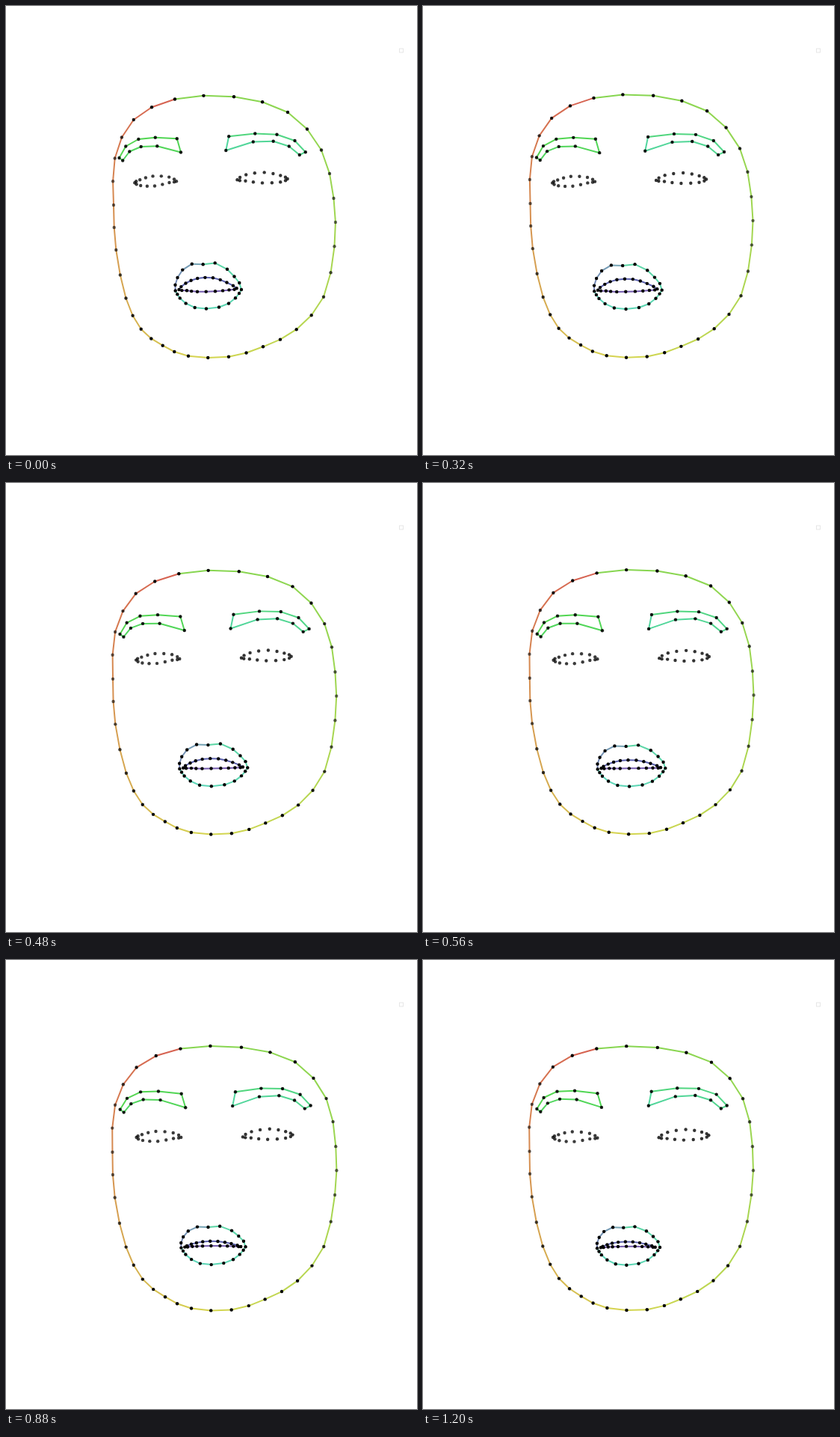
These frames come from a looping animation (550x600 px, 1.28 s). An HTML page with a canvas:

```html
<!DOCTYPE html>
<html lang="en">
<head>
<meta charset="utf-8">
<title>Face landmarks</title>
<style>
html, body { margin: 0; width: 100%; height: 100%; overflow: hidden; background: #fff; }
canvas { display: block; width: 550px; height: 600px; }
</style>
</head>
<body>
<canvas id="stage" width="550" height="600"></canvas>
<script>
const LOOP = 1280, STEP = 80;
const ctx = document.getElementById('stage').getContext('2d');
const hsl = (h, s, l) => `hsl(${h},${s}%,${l}%)`;

function ease(time, from, to) {
  const f = Math.min(1, Math.max(0, (time - from) / (to - from)));
  return f * f * (3 - 2 * f);
}

// Three gestures drive every landmark.
const gestures = time => ({
  turn: ease(time, 80, 720) - 0.27 * ease(time, 720, 1120),
  nod: ease(time, 0, 1100),
  shut: ease(time, 160, 860)
});

// Adds a point halfway between each pair of neighbours on a smooth closed curve.
function refine(points) {
  const n = points.length;
  return points.flatMap((p, i) => {
    const before = points[(i + n - 1) % n], q = points[(i + 1) % n], after = points[(i + 2) % n];
    return [p, p.map((v, k) => (9 * (v + q[k]) - before[k] - after[k]) / 16)];
  });
}

const mouthX = (u, { turn, shut }) => turn * (14 + 6.2 * u) - shut * (6 + 6.7 * u);
const mouthY = ({ turn, nod }) => 4.2 * nod - 1.3 * turn;

// move: shift of a landmark at u, v, which run from -1 to 1 across the part.
const outline = {
  shape: refine([[226, 124.5], [305, 121.2], [377, 142], [422, 192.5], [438.5, 257], [439.5, 321.3],
    [425, 388.7], [388.7, 432.2], [344, 455.3], [298, 468.8], [244, 467.7], [209.7, 453.7],
    [180.7, 431.8], [160.5, 390.5], [147.3, 326], [144, 266], [145.7, 203.5], [170.8, 152]]),
  ink: i => hsl(8 + 88 * (1 - (i / 35) ** 1.4), 62, 58),
  alpha: u => 1 - 0.42 * u ** 6,
  move: (u, v, { turn, nod }) => [
    turn * (0.5 + 7.8 * v * v + 1.7 * u) - nod * (0.8 + 3.3 * v * (1 + 0.9 * u)),
    turn * (1.8 * v - 1.7 * u - 1.3) - nod * (2 + 6 * u * u - 2.5 * u)
  ]
};

const leftBrow = {
  shape: [[151.5, 203], [160.3, 187.5], [177.3, 178], [199.8, 175.7], [228.8, 177.2],
    [234, 195.5], [202.3, 187.2], [180.7, 188], [165.3, 194.5], [156.2, 206.5]],
  ink: i => hsl(118 + i, 62, 58),
  alpha: () => 0.88,
  move: (u, v, { turn, nod }) => [
    turn * (4.4 + 2.8 * u) - 0.3 * nod,
    turn * (2 + 0.3 * u) + nod * (2.5 * u - 2.8)
  ]
};

const rightBrow = {
  shape: [[298.2, 174.2], [333.3, 170.5], [362.5, 171.7], [386.5, 180], [400.8, 195.2],
    [392.8, 199], [378.8, 187.5], [357.7, 180.8], [330.8, 181.5], [294.3, 193]],
  ink: i => hsl(140 + i * 1.6, 62, 58),
  alpha: () => 0.9,
  move: (u, v, { turn, nod }) => [
    turn * (7.3 - 1.1 * u) + 1.4 * nod,
    turn * (1.1 - 1.1 * u) - nod * (0.3 + 0.4 * u)
  ]
};

const leftEye = {
  shape: refine([[172.3, 236.2], [179.2, 232.2], [196.5, 227.4], [218.2, 228.6],
    [228, 234.2], [218.5, 236], [199, 240.5], [180.2, 240]]),
  alpha: () => 0.77,
  move: (u, v, { turn, nod }) => [
    turn * (4.3 + 1.2 * u) + nod * (0.4 + u),
    nod * (2.8 + 2 * u) - turn * (0.8 + 0.9 * u)
  ]
};

const rightEye = {
  shape: refine([[309.5, 232.2], [321.2, 225.5], [345.7, 222.4], [367.3, 226.5],
    [376.7, 231], [367.2, 235.2], [343, 236.4], [320.5, 233.8]]),
  alpha: () => 0.8,
  move: (u, v, { turn, nod }) => [
    turn * (7.3 - 0.35 * u) + 0.6 * nod,
    nod * (5.2 - 0.9 * u) - 1.4 * turn
  ]
};

const outerLips = {
  shape: [[226.7, 380.5], [226.5, 372.8], [229.5, 363], [236.3, 352.6], [248.8, 344.7],
    [263.7, 345.3], [279.7, 343.4], [296, 351.8], [305.5, 361.5], [312.3, 370],
    [315, 379], [312, 384], [307, 390.3], [298, 397.5], [285, 402.5],
    [268, 404.5], [252.7, 403], [240.7, 397.4], [232.8, 390.4], [229.3, 385.3]],
  ink: i => i < 5 ? hsl(228 - i * 8, 30, 58) : hsl(152 + i * 0.8, 60, 60),
  alpha: () => 1,
  move: (u, v, g) => [mouthX(u, g), mouthY(g) + g.shut * 9.7 * ((1 - v) / 2) ** 2]
};

const innerLips = {
  shape: refine([[231.5, 379], [240.5, 370.5], [256.2, 364], [277, 363.3], [295.5, 369.5],
    [308.7, 377.3], [298.5, 379.4], [280, 381.2], [256, 381.7], [242, 380.3]]),
  ink: i => hsl(i < 10 ? 236 : 258, 34, 52),
  alpha: () => 1,
  move: (u, v, g) => [mouthX(u, g), mouthY(g) + g.shut * (4 - 6.3 * v + 2.5 * u * u)]
};

const parts = [outline, leftBrow, rightBrow, leftEye, rightEye, outerLips, innerLips];

// Position of each value between the smallest (-1) and the largest (1).
function normalise(values) {
  const low = Math.min(...values), high = Math.max(...values);
  return values.map(v => 2 * (v - low) / (high - low) - 1);
}

for (const part of parts) {
  part.u = normalise(part.shape.map(p => p[0]));
  part.v = normalise(part.shape.map(p => p[1]));
}

function pose(part, g) {
  return part.shape.map(([x, y], i) => {
    const [dx, dy] = part.move(part.u[i], part.v[i], g);
    return [x + dx, y + dy];
  });
}

function drawLines(part, points) {
  points.forEach((p, i) => {
    ctx.strokeStyle = part.ink(i);
    ctx.beginPath();
    ctx.moveTo(...p);
    ctx.lineTo(...points[(i + 1) % points.length]);
    ctx.stroke();
  });
}

function drawDots(part, points) {
  points.forEach(([x, y], i) => {
    ctx.fillStyle = `rgba(0,0,0,${part.alpha(part.u[i])})`;
    ctx.beginPath();
    ctx.arc(x, y, 2.2, 0, Math.PI * 2);
    ctx.fill();
  });
}

function draw(time) {
  ctx.fillStyle = '#fff';
  ctx.fillRect(0, 0, 550, 600);
  ctx.lineWidth = 1;
  ctx.strokeStyle = '#e6e6e6';
  ctx.strokeRect(526.5, 57, 5, 5);
  ctx.lineWidth = 2;
  ctx.lineCap = 'round';
  const g = gestures(time);
  const poses = parts.map(part => pose(part, g));
  parts.forEach((part, i) => part.ink && drawLines(part, poses[i]));
  parts.forEach((part, i) => drawDots(part, poses[i]));
}

function tick() {
  const time = performance.now() % LOOP;
  draw(Math.floor(time / STEP) * STEP);
  requestAnimationFrame(tick);
}
tick();
</script>
</body>
</html>
```
